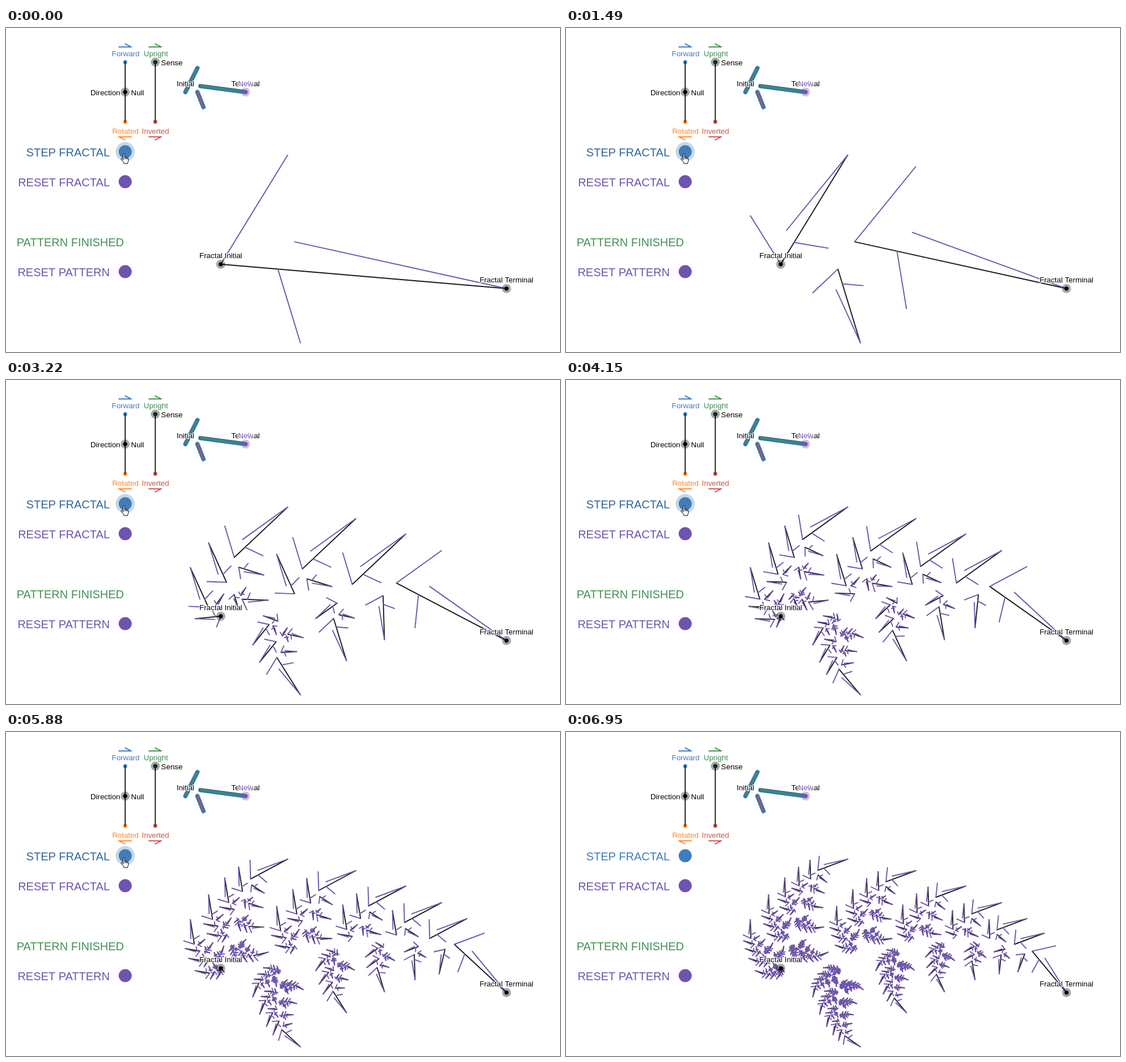
An HTML page with a canvas that plays this animation: 977 by 573 pixels, repeating every 8200 ms.

```html
<!DOCTYPE html>
<html lang="en">
<head>
<meta charset="utf-8">
<title>Fractal stepper</title>
<style>
  html, body { margin: 0; width: 100%; height: 100%; overflow: hidden; background: #fff; }
  canvas { display: block; }
</style>
</head>
<body>
<canvas id="stage" width="977" height="573"></canvas>
<script>
const ctx = document.getElementById('stage').getContext('2d');
const LOOP = 8200;
const BLACK = '#1a1a1a', BLUE = '#3f7dbb', GREEN = '#429250', RED = '#cd5250',
      ORANGE = '#fa8930', PURPLE = '#6f54af';

// Button presses as [down, up], and the times at which the fractal grows.
const presses = [[1230, 1360], [2020, 2290], [2950, 3220], [3880, 4150], [4820, 4950], [5750, 5880]];
const growTimes = [1490, 2290, 3220, 4150, 5080, 6280];
const HOVER_END = 6550, ARROW_START = 6680, ARROW_END = 6950;

// Pattern strokes relative to a unit base: start, end, mirrored or not.
const pattern = [
  { from: [0, 0], to: [0.2, -0.4], flip: 1 },
  { from: [0.25, -0.1], to: [1, 0], flip: 1 },
  { from: [0.2, 0], to: [0.3, 0.25], flip: -1 }
];

function place({ a, b, sense }, [u, v]) {
  const dx = b[0] - a[0], dy = b[1] - a[1];
  return [a[0] + u * dx - v * sense * dy, a[1] + u * dy + v * sense * dx];
}

function grow(segments) {
  return segments.flatMap(s => pattern.map(p => (
    { a: place(s, p.from), b: place(s, p.to), sense: s.sense * p.flip })));
}

const initial = [378.7, 417.8], terminal = [882.6, 460.8];
const levels = [[{ a: initial, b: terminal, sense: 1 }]];
for (let i = 0; i <= growTimes.length; i++) levels.push(grow(levels[i]));

const control = { a: [316.4, 113.3], b: [422.4, 113.3], sense: 1 };
const patternLines = pattern.map(p => (
  { a: place(control, p.from), b: place(control, p.to), color: p.flip > 0 ? GREEN : RED }));

function strokeSegments(segments, color, width = 1.9) {
  ctx.beginPath();
  for (const { a, b } of segments) {
    ctx.moveTo(...a);
    ctx.lineTo(...b);
  }
  ctx.strokeStyle = color;
  ctx.lineWidth = width;
  ctx.stroke();
}

function dot(x, y, r, color, alpha = 1) {
  ctx.globalAlpha = alpha;
  ctx.fillStyle = color;
  ctx.beginPath();
  ctx.arc(x, y, r, 0, 2 * Math.PI);
  ctx.fill();
  ctx.globalAlpha = 1;
}

function handle(x, y, color = '#000', haloAlpha = 0.35) {
  dot(x, y, 8, color, haloAlpha);
  dot(x, y, 3.6, color);
}

function label(text, x, y, color = '#000', align = 'center', size = 13.33) {
  ctx.font = `${size}px "Liberation Sans", Arial, sans-serif`;
  ctx.textAlign = align;
  ctx.strokeStyle = '#fff';
  ctx.lineWidth = 2.5;
  ctx.strokeText(text, x, y);
  ctx.fillStyle = color;
  ctx.fillText(text, x, y);
}

// Half arrow centred on x, y; dir is where it points, side is where the barb lies.
function harpoon(x, y, dir, side, color) {
  const tip = [x + 11 * dir, y];
  strokeSegments([{ a: [x - 11 * dir, y], b: tip }, { a: tip, b: [x, y + 5.3 * side] }], color);
}

function drawControls() {
  harpoon(210, 33.5, 1, -1, BLUE);
  harpoon(263, 33.5, 1, -1, GREEN);
  harpoon(210, 192.5, -1, 1, ORANGE);
  harpoon(263, 192.5, 1, 1, RED);

  dot(210.2, 60.3, 3.5, BLUE);
  dot(210.2, 166, 3.5, ORANGE);
  dot(263.3, 166, 3.5, RED);
  strokeSegments([210.2, 263.3].map(x => ({ a: [x, 60.3], b: [x, 166] })), BLACK);

  strokeSegments(patternLines, '#3674ae', 7.6);
  for (const line of patternLines) strokeSegments([line], line.color, 2.2);

  handle(210.2, 113.3);
  handle(263.3, 60.3);
  dot(263.3, 60.3, 2.6, '#14381b');
  handle(422.4, 113.3, PURPLE);

  label('Forward', 211, 50, BLUE);
  label('Upright', 264.3, 50, GREEN);
  label('Rotated', 210.5, 186.7, ORANGE);
  label('Inverted', 263.6, 186.7, RED);
  label('Direction', 201.5, 119, '#000', 'right');
  label('Null', 220.5, 119, '#000', 'left');
  label('Sense', 273.6, 66, '#000', 'left');
  label('Initial', 316.5, 103);
  label('Terminal', 422.4, 103);
  label('New', 422.6, 103, PURPLE);
}

function drawButtons(hover, pressed) {
  if (hover) dot(210.2, 218.8, 17, BLUE, pressed ? 0.45 : 0.3);
  dot(210.2, 218.8, 11.5, BLUE);
  dot(210.2, 271.8, 11.5, PURPLE);
  dot(210.2, 430.8, 11.5, PURPLE);
  const stepColor = pressed ? '#275580' : hover ? '#32679c' : BLUE;
  label('STEP FRACTAL', 183, 226.7, stepColor, 'right', 20);
  label('RESET FRACTAL', 183, 279.7, PURPLE, 'right', 20);
  label('PATTERN FINISHED', 208, 385.7, GREEN, 'right', 20);
  label('RESET PATTERN', 183, 438.7, PURPLE, 'right', 20);
}

const handShape = new Path2D('M4.3 11V2Q4.3.6 5.6.6T6.9 2V6.3Q9 5.8 9.3 7Q11 6.5 11.5 7.7' +
  'Q13.6 7.3 13.6 9.5V12.5Q13.6 14 12.4 15.5V17.8H5.5V16Q3 13 .8 10.5Q0 8.8 1.6 8.6Q3 8.6 4.3 11Z' +
  'M6.9 6.3V9.5M9.3 7V9.8M11.5 7.7V10');
const arrowShape = new Path2D('M.5.5V12L3.2 9.5L5 13.6L6.7 12.9L5 9H8.6Z');

function cursor(shape, x, y) {
  ctx.save();
  ctx.translate(x, y);
  ctx.fillStyle = '#fff';
  ctx.strokeStyle = '#000';
  ctx.lineWidth = 1;
  ctx.fill(shape);
  ctx.stroke(shape);
  ctx.restore();
}

function draw(t) {
  const step = growTimes.filter(time => t >= time).length;
  const hover = t < HOVER_END;
  const pressed = presses.some(([down, up]) => t >= down && t < up);

  ctx.fillStyle = '#fff';
  ctx.fillRect(0, 0, 977, 573);
  strokeSegments(levels[step], BLACK);
  strokeSegments(levels[step + 1], PURPLE);
  handle(...initial);
  handle(...terminal);
  label('Fractal Initial', 378.8, 407);
  label('Fractal Terminal', 882.6, 450.3);
  drawControls();
  drawButtons(hover, pressed);

  if (hover) cursor(handShape, 202.3, 222);
  else if (t >= ARROW_START && t < ARROW_END) cursor(arrowShape, 755, 508);
}

ctx.lineCap = ctx.lineJoin = 'round';
const start = performance.now();
function frame() {
  draw((performance.now() - start) % LOOP);
  requestAnimationFrame(frame);
}
frame();
</script>
</body>
</html>
```
